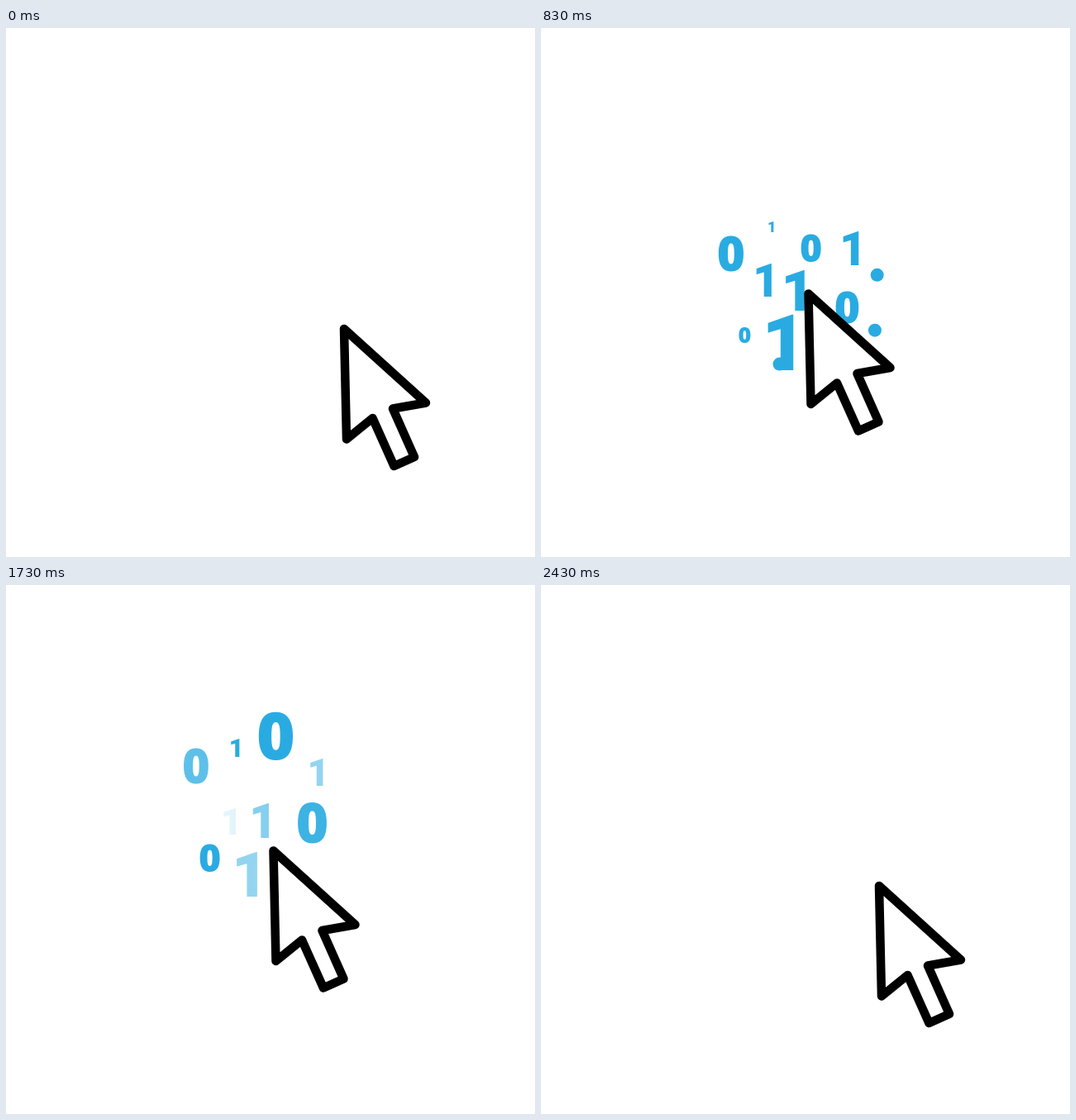
An HTML page that plays this animation: 640x640 px, repeating every 2860 ms.

```html
<!DOCTYPE html>
<html lang="en">
<head>
<meta charset="utf-8">
<title>Click burst</title>
<style>
  html, body { margin: 0; width: 100%; height: 100%; overflow: hidden; background: #fff; }
  svg { display: block; width: 100vw; height: 100vh; }
  .data { fill: #29abe2; }
  text { text-anchor: middle; }
  .zero { font: 800 100px "Open Sans", "Noto Sans", sans-serif; }
  .one { font: 900 100px Roboto, sans-serif; }
  .rays { stroke: #000; stroke-width: 6.5; stroke-linecap: round; }
  .cursor { fill: #fff; stroke: #000; stroke-width: 10.5; stroke-linejoin: round; }
</style>
</head>
<body>
<svg viewBox="0 0 640 640">
  <g class="rays"></g>
  <g class="data"></g>
  <path class="cursor" d="M323.5 321.5L422.5 411L382.5 418L408.5 476.5L384 487.5L358 429.5L326.5 455Z"/>
</svg>
<script>
const LOOP = 2860;
const HUB = { x: 326, y: 329 };

// glyph, x, baseline at step 38, rise per step, font size, step of full size, step where fading starts
const DIGITS = [
  ["0", 230, 252.5, 2.44, 58.5, 21, 41],
  ["1", 280, 217, 1.78, 30, 24, 43.2],
  ["0", 326.5, 227, 3.3, 77.5, 24, 43.2],
  ["1", 380, 253, 2, 47.5, 19, 39],
  ["1", 274.5, 307, 1.05, 45.5, 17.5, 36],
  ["1", 313.5, 314, 1.65, 60, 19.7, 39.5],
  ["0", 370.5, 322, 2.07, 67, 22.5, 42.2],
  ["0", 246.5, 354.5, 1.56, 45, 24, 43.2],
  ["1", 298, 385, 1.7, 77, 17.5, 39]
];
const DOT_ANGLES = [-20.5, 25.2, 115.8];

const $ = selector => document.querySelector(selector);
const clamp = (v, lo = 0, hi = 1) => Math.min(hi, Math.max(lo, v));
const ramp = (s, from, to) => clamp((s - from) / (to - from));
const smooth = x => x * x * (3 - 2 * x);

function add(parent, tag) {
  return parent.appendChild(document.createElementNS("http://www.w3.org/2000/svg", tag));
}

function polar(angle, r) {
  const a = angle * Math.PI / 180;
  return [HUB.x + r * Math.cos(a), HUB.y + r * Math.sin(a)];
}

function set(el, attrs) {
  for (const name in attrs) el.setAttribute(name, attrs[name]);
}

const cursor = $(".cursor");
const rays = Array.from({ length: 8 }, () => add($(".rays"), "line"));
const dots = DOT_ANGLES.map(() => add($(".data"), "circle"));
const digits = DIGITS.map(([glyph]) => {
  const el = add($(".data"), "text");
  el.textContent = glyph;
  set(el, glyph === "1" ? { class: "one", x: -4.2 } : { class: "zero" });
  return el;
});

function drawCursor(s) {
  const away = 1 - smooth(ramp(s, 0, 8)) + smooth(ramp(s, 52.25, 61));
  set(cursor, { transform: `translate(${85.5 * away} ${42.5 * away})` });
}

function drawRays(s) {
  const outer = 77 * ramp(s, 7.08, 13);
  const inner = 77 * ramp(s, 9.5, 14);
  $(".rays").style.display = s > 7 && s < 14 ? "" : "none";
  rays.forEach((ray, i) => {
    const [x1, y1] = polar(i * 45, inner);
    const [x2, y2] = polar(i * 45, outer);
    set(ray, { x1, y1, x2, y2 });
  });
}

function drawDots(s) {
  const left = 1 - ramp(s, 17, 27);
  const dist = 134.6 * (1 - left * left);
  const r = s < 17 ? 0 : clamp(8 - (s - 21) * 0.625, 0, 8);
  dots.forEach((dot, i) => {
    const [cx, cy] = polar(DOT_ANGLES[i], dist);
    set(dot, { cx, cy, r });
  });
}

// Linear growth, then a damped swing around full size.
function pop(u) {
  if (u < 0) return Math.max(0, 1 + u / 7.5);
  return 1 + 0.32 * Math.exp(-0.11 * u) * Math.sin(u * Math.PI / 7);
}

function drawDigits(s) {
  DIGITS.forEach(([, x, base, rise, size, full, fade], i) => {
    const scale = pop(s - full) * size / 100;
    const y = base - (s - 38) * rise;
    set(digits[i], {
      transform: `translate(${x} ${y}) scale(${scale})`,
      opacity: scale > 0 ? 1 - ramp(s, fade, fade + 8) : 0
    });
  });
}

// 25 steps per second shown on a 30 Hz grid.
function stepAt(ms) {
  const tick = Math.floor(ms * 0.03 + 0.11);
  return Math.min(61, Math.floor(tick * 5 / 6 + 0.4));
}

const start = performance.now();
function draw() {
  const s = stepAt((performance.now() - start) % LOOP);
  drawCursor(s);
  drawRays(s);
  drawDots(s);
  drawDigits(s);
  requestAnimationFrame(draw);
}
draw();
</script>
</body>
</html>
```
